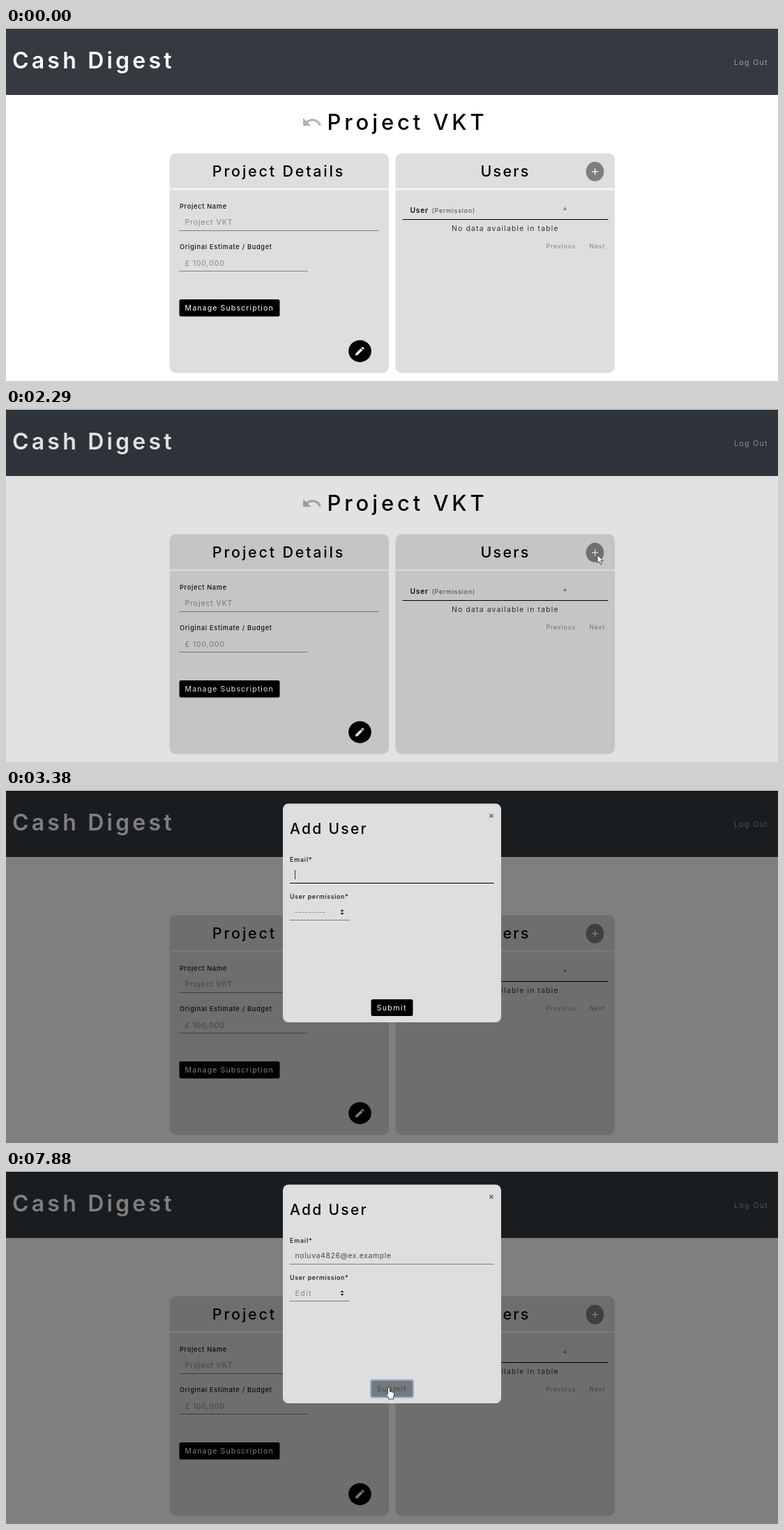
Animation, 1107 px wide and 506 px high, one loop 8 s. Source, as an HTML page:

```html
<!DOCTYPE html>
<html lang="en">
<head>
<meta charset="utf-8">
<title>Add user</title>
<style>
html, body { margin: 0; width: 100%; height: 100%; overflow: hidden; background: #fff; }
svg { display: block; width: 100%; height: 100%; }
text { font-family: Inter, "Open Sans", sans-serif; }

.title { font-size: 32px; font-weight: 600; letter-spacing: 4.2px; fill: #fff; }
.heading { font-size: 31px; font-weight: 500; letter-spacing: 4.9px; }
.subhead { font-size: 21.5px; font-weight: 500; letter-spacing: 2.8px; }
.label { font-size: 9.2px; font-weight: 500; letter-spacing: .72px; fill: #111; }
.field { font-size: 10.6px; letter-spacing: .85px; fill: #858585; }
.button { font-size: 10.6px; letter-spacing: 1.1px; fill: #fff; }
.small { font-size: 8.8px; letter-spacing: .85px; fill: #444; }
.pale { fill: #808080; }
.panel { fill: #dedede; }
.rule { stroke: #000; }
.dots { stroke: #222; stroke-dasharray: 1 1; }

/* One shared 8 s clock; hard switches use step-end */
.switch, .backdrop, .modal, .pointer { animation: 8s step-end infinite; }
.pointer { animation-name: move; }
.backdrop { animation-name: dim; }
.modal { animation-name: drop; }
.shown { animation-name: shown; }
.arrow { animation-name: arrow; }
.hand { animation-name: hand; }
.hover { animation-name: hover; }
.caret { animation-name: caret; }
.pasted { animation-name: pasted; }
.email-focus { animation-name: email-focus; }
.select-focus { animation-name: select-focus; }
.empty { animation-name: empty; }
.chosen { animation-name: chosen; }
.pressed { animation-name: pressed; }

@keyframes move {
  0% { transform: translate(932px, 494px); }
  11% { transform: translate(932px, 494px); animation-timing-function: steps(7); }
  20.375% { transform: translate(872px, 300px); }
  21.875% { transform: translate(872px, 300px); animation-timing-function: steps(2); }
  24.5% { transform: translate(848px, 209px); }
  32.875% { transform: translate(760px, 176px); }
  34.125% { transform: translate(650px, 142px); }
  35.375% { transform: translate(632px, 242px); }
  61.5% { transform: translate(632px, 242px); animation-timing-function: steps(6); }
  69.5% { transform: translate(470px, 179px); }
  71.375% { transform: translate(462px, 181px); }
  84.875% { transform: translate(462px, 181px); animation-timing-function: steps(7); }
  94.25%, 100% { transform: translate(549px, 310px); }
}
@keyframes dim {
  0% { opacity: 0; }
  28.625% { opacity: .115; }
  30.25%, 100% { opacity: .5; }
}
@keyframes drop {
  0% { opacity: 0; transform: translateY(-30px); }
  30.25% { opacity: .12; transform: translateY(-29px); }
  31.25% { opacity: .6; transform: translateY(-17px); }
  32.875% { opacity: 1; transform: translateY(-4px); }
  34.125% { opacity: 1; transform: translateY(-1px); }
  35.375%, 100% { opacity: 1; transform: none; }
}
@keyframes shown { 0%, 35.375% { opacity: 0; } 11%, 61.5%, 100% { opacity: 1; } }
@keyframes arrow { 0%, 28.625% { opacity: 1; } 24.5%, 93%, 100% { opacity: 0; } }
@keyframes hand { 0%, 28.625% { opacity: 0; } 24.5%, 93%, 100% { opacity: 1; } }
@keyframes hover { 0%, 28.625%, 100% { opacity: 0; } 24.5% { opacity: 1; } }
@keyframes caret { 0%, 49.5%, 58.875%, 100% { opacity: 0; } 42.25%, 54.75% { opacity: 1; } }
@keyframes pasted { 0% { opacity: 0; } 58.875%, 100% { opacity: 1; } }
@keyframes email-focus { 0%, 72.375%, 100% { opacity: 0; } 42.25% { opacity: 1; } }
@keyframes select-focus { 0%, 95.875%, 100% { opacity: 0; } 72.375% { opacity: 1; } }
@keyframes empty { 0% { opacity: 1; } 84.875%, 100% { opacity: 0; } }
@keyframes chosen { 0% { opacity: 0; } 84.875%, 100% { opacity: 1; } }
@keyframes pressed { 0% { opacity: 0; } 98.5%, 100% { opacity: 1; } }
</style>
</head>
<body>
<svg viewBox="0 0 1107 506" preserveAspectRatio="none">
  <!-- Header -->
  <rect y="1" width="1107" height="95" fill="#343a40"/>
  <text class="title" x="9" y="57.5">Cash Digest</text>
  <text class="field" x="1044" y="52.5" style="letter-spacing:1.3px;fill:#a0a3a6">Log Out</text>

  <path transform="translate(423.5 120) scale(1.27)" fill="#b2b2b2" d="M12.5 8c-2.65 0-5.05.99-6.9 2.6L2 7v9h9l-3.62-3.62c1.39-1.16 3.16-1.88 5.12-1.88 3.54 0 6.55 2.31 7.6 5.5l2.37-.78C21.08 11.03 17.15 8 12.5 8z"/>
  <text class="heading" x="460.5" y="146">Project VKT</text>

  <!-- Project panel -->
  <rect class="panel" x="234.5" y="179.5" width="314.5" height="315" rx="9"/>
  <rect x="234.5" y="229.5" width="314.5" height="3" fill="#f4f4f4"/>
  <text class="subhead" x="295.8" y="212.5">Project Details</text>
  <text class="label" x="249" y="258.5">Project Name</text>
  <text class="field" x="256.5" y="282.3">Project VKT</text>
  <path class="dots" d="M249 290.5H534"/>
  <text class="label" x="249" y="317">Original Estimate / Budget</text>
  <text class="field" x="256.5" y="340.5">£ 100,000</text>
  <path class="dots" d="M249 348.5H433"/>
  <rect x="248.5" y="389" width="144" height="24.5" rx="2.5"/>
  <text class="button" x="256.5" y="405">Manage Subscription</text>
  <ellipse cx="507.5" cy="463.2" rx="16.3" ry="15.7"/>
  <path transform="translate(499.2 455) scale(.68)" fill="#fff" d="M3 17.25V21h3.75L17.81 9.94l-3.75-3.75zM20.71 7.04a1 1 0 0 0 0-1.41l-2.34-2.34a1 1 0 0 0-1.41 0l-1.83 1.83 3.75 3.75z"/>

  <!-- Users panel -->
  <rect class="panel" x="558.5" y="179.5" width="314.5" height="315" rx="9"/>
  <rect x="558.5" y="229.5" width="314.5" height="3" fill="#f4f4f4"/>
  <text class="subhead" x="680.5" y="212.5" style="letter-spacing:2.2px">Users</text>
  <ellipse cx="844.5" cy="205.8" rx="12.8" ry="14" fill="#7e7e7e"/>
  <ellipse class="switch hover" cx="844.5" cy="205.8" rx="12.8" ry="14"/>
  <path d="M840 205.8h9.2M844.6 201.2v9.2" stroke="#fff" stroke-width="1.3"/>
  <text class="label" x="579.5" y="265" style="font-size:10.3px;font-weight:600">User</text>
  <text class="small" x="610.5" y="264.5">(Permission)</text>
  <path d="M799 261l2.5-5 2.5 5z" fill="#7d7fd0"/>
  <path class="rule" d="M568.5 274.5H863.5"/>
  <text class="field" x="639" y="291.2" style="font-size:10.4px;letter-spacing:1.17px;fill:#333">No data available in table</text>
  <text class="small pale" x="774.5" y="315.8">Previous</text>
  <text class="small pale" x="836.5" y="315.8">Next</text>

  <rect class="backdrop" y="1" width="1107" height="505"/>

  <!-- Dialog -->
  <g class="modal">
    <rect class="panel" x="397" y="19.5" width="313" height="313.5" rx="8"/>
    <path d="M693.5 34.5l5 5m0-5l-5 5" stroke="#555" stroke-width="1.2"/>
    <text class="subhead" x="407" y="62.5" style="font-size:21px;letter-spacing:2.3px">Add User</text>
    <text class="label" x="407" y="102.5" style="font-size:8.8px;letter-spacing:.9px">Email*</text>
    <path class="dots" d="M407 133.5H699.5"/>
    <path class="rule switch email-focus" d="M407 133.5H699.5"/>
    <path class="switch caret" d="M414.5 115v13" stroke="#333"/>
    <text class="field switch pasted" x="414.5" y="125.2" style="font-size:10.4px;letter-spacing:.65px;fill:#484848">noluva4826@ex.example</text>
    <text class="label" x="407" y="155.5" style="font-size:8.8px;letter-spacing:.7px">User permission*</text>
    <text class="field switch empty" x="414" y="179" style="letter-spacing:0">---------</text>
    <text class="field switch chosen" x="414.5" y="178.8" style="letter-spacing:1.4px">Edit</text>
    <path d="M479.5 174l2.5-3 2.5 3zM479.5 176l2.5 3 2.5-3z" fill="#222"/>
    <path class="dots" d="M407 186.5H492"/>
    <path class="rule switch select-focus" d="M407 186.5H492"/>
    <rect x="523.5" y="300" width="60" height="24" rx="2.5"/>
    <text class="button" x="531.5" y="316" style="letter-spacing:1.4px">Submit</text>
    <g class="switch pressed">
      <rect x="523.2" y="299.8" width="60.6" height="24.4" rx="2.5" fill="#767a7e" stroke="#86abd0" stroke-width="2"/>
      <text class="button" x="531.5" y="316" style="letter-spacing:1.4px;fill:#444">Submit</text>
    </g>
  </g>

  <rect width="1107" height="1" fill="#e4e4e4"/>

  <!-- Pointer -->
  <g class="pointer">
    <g class="switch shown" fill="#fff" stroke="#333" stroke-width=".9" stroke-linejoin="round">
      <path class="switch arrow" d="M0 0V12l2.7-2.5 2 4.4 2-.9-2-4.3h3.6z"/>
      <path class="switch hand" d="M-1.5 1Q0-1 1.3 1V6l5 1.2Q8 7.6 7.6 10L6.5 14V17H-.5V15L-4 10.6Q-4.2 8.6-2.6 9.4L-1.5 10.6z"/>
    </g>
  </g>
</svg>
</body>
</html>
```
